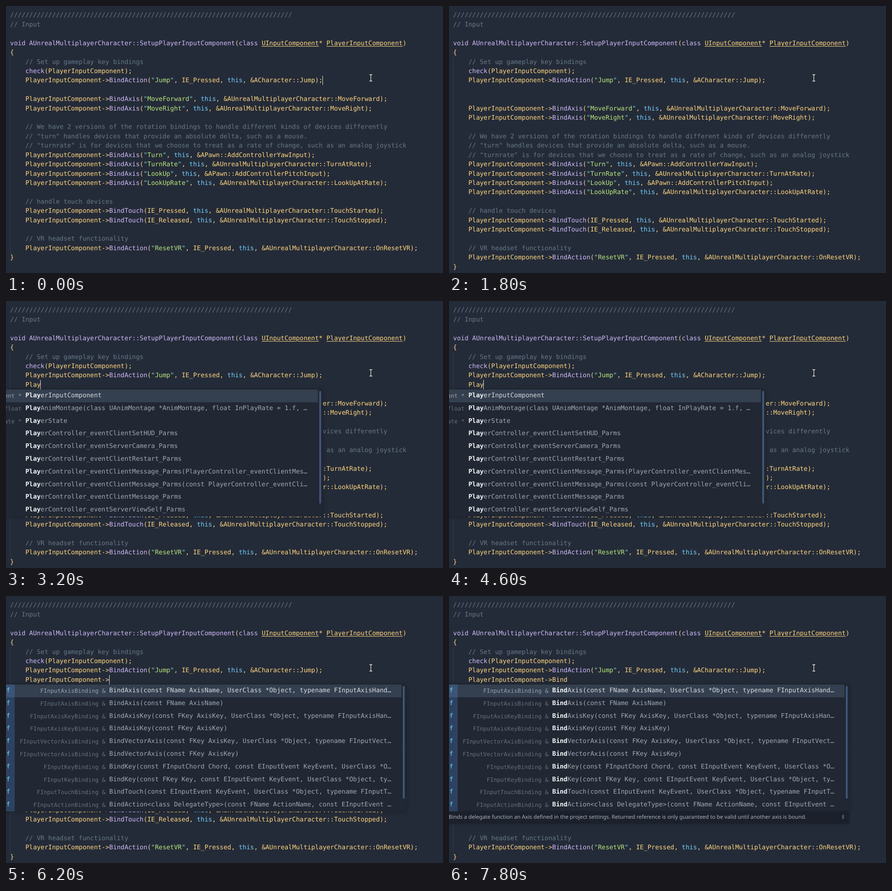
Recreate the animation shown at these times as an HTML page. Size 957 by 585 pixels, loop 8 s.

```html
<!DOCTYPE html>
<html lang="en">
<head>
<meta charset="utf-8">
<title>Code completion</title>
<style>
  html, body { margin: 0; width: 100%; height: 100%; overflow: hidden; background: #242b38; }
  #stage {
    position: relative; width: 957px; height: 585px; overflow: hidden;
    color: #ffd580; font: 13.86px "DejaVu Sans Mono", monospace;
    text-rendering: geometricPrecision; font-variant-ligatures: none;
  }
  #stage div, svg { position: absolute; }
  .line { left: 9.1px; line-height: 20px; white-space: pre; }
  .fn { color: #cfbafa; }
  .str { color: #bae67e; }
  .quote { color: #6fd0d8; }
  .this { color: #73d0ff; }
  .note { color: #667788; }
  u { text-underline-offset: 1.5px; text-decoration-thickness: 1px; }
  #guide { left: 9px; top: 112px; width: 1px; background: #323a48; }
  #caret { width: 1px; background: #e6e6e6; }
  #popup { top: 194px; background: #212733; box-shadow: 0 0 8px rgba(0, 0, 0, .35); }
  .row { left: 0; right: 10px; height: 27.8px; line-height: 27.8px; white-space: pre; color: #a0a9b6; }
  .row div { top: 0; }
  .row.on { background: #343f4f; color: #d5dae1; }
  .row b { color: #f4f6f8; }
  .row .icon { left: 0; width: 28px; height: 100%; background: #2d4260; color: #73d0ff; text-align: center; }
  .row.on .icon { background: #3a5577; }
  .type { font-size: 12.47px; color: #68717e; }
  .on .type { color: #98a2af; }
  .thumb { background: #3f5777; border-radius: 2px; }
  .doc {
    left: 0; right: 0; top: 278px; height: 26px; background: #1b202b; color: #a9b2be;
    box-shadow: 0 1px 5px rgba(0, 0, 0, .3);
    font: 11.76px/25px "Noto Sans", "Open Sans", sans-serif; text-indent: 8px; white-space: pre;
  }
</style>
</head>
<body>
<div id="stage">
  <div id="guide"></div>
  <div id="code"></div>
  <div id="caret"></div>
  <div id="popup"></div>
  <svg width="12" height="20" style="left:793px;top:147px" fill="none">
    <path d="M3 3.5H5.5L6 4L6.5 3.5H9M6 4V17M3 17.5H5.5L6 17L6.5 17.5H9" stroke="#10141b" stroke-width="3"/>
    <path d="M3 3.5H5.5L6 4L6.5 3.5H9M6 4V17M3 17.5H5.5L6 17L6.5 17.5H9" stroke="#fff" stroke-width="1.3"/>
  </svg>
</div>
<script>
const LOOP = 8000, CHAR = 8.345, TYPE_CHAR = 7.507, ROW = 27.8;
const $ = id => document.getElementById(id);
const colX = col => 9.1 + col * CHAR;
const lineY = n => 9.9 + n * 20.42;
const esc = s => s.replace(/&/g, "&amp;").replace(/</g, "&lt;").replace(/>/g, "&gt;");

const pic = "PlayerInputComponent", self = "&AUnrealMultiplayerCharacter::";
const call = (fn, args) => `    ${pic}->${fn}(${args});`;
const axis = (name, target) => call("BindAxis", `"${name}", this, ${target}`);
const head = [
  "/".repeat(74),
  "// Input",
  "",
  `void AUnrealMultiplayerCharacter::SetupPlayerInputComponent(class UInputComponent* ${pic})`,
  "{",
  "    // Set up gameplay key bindings",
  `    check(${pic});`,
  call("BindAction", '"Jump", IE_Pressed, this, &ACharacter::Jump')
];
const tail = [
  "",
  axis("MoveForward", self + "MoveForward"),
  axis("MoveRight", self + "MoveRight"),
  "",
  "    // We have 2 versions of the rotation bindings to handle different kinds of devices differently",
  '    // "turn" handles devices that provide an absolute delta, such as a mouse.',
  '    // "turnrate" is for devices that we choose to treat as a rate of change, such as an analog joystick',
  axis("Turn", "&APawn::AddControllerYawInput"),
  axis("TurnRate", self + "TurnAtRate"),
  axis("LookUp", "&APawn::AddControllerPitchInput"),
  axis("LookUpRate", self + "LookUpAtRate"),
  "",
  "    // handle touch devices",
  call("BindTouch", `IE_Pressed, this, ${self}TouchStarted`),
  call("BindTouch", `IE_Released, this, ${self}TouchStopped`),
  "",
  "    // VR headset functionality",
  call("BindAction", `"ResetVR", IE_Pressed, this, ${self}OnResetVR`),
  "}"
];

const bindAxis = [
  "FInputAxisBinding &|BindAxis(const FName AxisName, UserClass *Object, typename FInputAxisHand…",
  "FInputAxisBinding &|BindAxis(const FName AxisName)"
];
const bindKey = [
  "FInputKeyBinding &|BindKey(const FInputChord Chord, const EInputEvent KeyEvent, UserClass *O…",
  "FInputKeyBinding &|BindKey(const FKey Key, const EInputEvent KeyEvent, UserClass *Object, ty…"
];
const bindAction = "FInputActionBinding &|BindAction(const FName ActionName, const EInputEvent KeyEvent, UserClass …";
const bindDelegate = "FInputActionBinding &|BindAction<class DelegateType>(const FName ActionName, const EInputEvent …";
const bindTouch = "FInputTouchBinding &|BindTouch(const EInputEvent KeyEvent, UserClass *Object, typename FInputT…";
const until = "Returned reference is only guaranteed to be valid until another";

const player = {
  col: 4, right: 693,
  items: [
    "UInputComponent *|PlayerInputComponent",
    "float|PlayAnimMontage(class UAnimMontage *AnimMontage, float InPlayRate = 1.f, …",
    "APlayerState *|PlayerState",
    "|PlayerController_eventClientSetHUD_Parms",
    "|PlayerController_eventServerCamera_Parms",
    "|PlayerController_eventClientRestart_Parms",
    "|PlayerController_eventClientMessage_Parms(PlayerController_eventClientMes…",
    "|PlayerController_eventClientMessage_Parms(const PlayerController_eventCli…",
    "|PlayerController_eventClientMessage_Parms",
    "|PlayerController_eventServerViewSelf_Parms"
  ]
};
const letterB = {
  col: 26, right: 876,
  doc: `Binds a chord event to a delegate function. ${until} input key is bound.`,
  items: [
    ...bindKey, bindAction, bindAction, bindDelegate, bindTouch,
    "FInputGestureBinding &|BindGesture(const FKey GestureKey, UserClass *Object, typename FInputGest…",
    ...bindAxis,
    "void|UActorComponent::BeginPlay()"
  ]
};
const bind = {
  col: 26, right: 876,
  doc: `Binds a delegate function an Axis defined in the project settings. ${until} axis is bound.`,
  items: [
    ...bindAxis,
    "FInputAxisKeyBinding &|BindAxisKey(const FKey AxisKey, UserClass *Object, typename FInputAxisHan…",
    "FInputAxisKeyBinding &|BindAxisKey(const FKey AxisKey)",
    "FInputVectorAxisBinding &|BindVectorAxis(const FKey AxisKey, UserClass *Object, typename FInputVect…",
    "FInputVectorAxisBinding &|BindVectorAxis(const FKey AxisKey)",
    ...bindKey, bindTouch, bindDelegate
  ]
};
const bindPlain = { ...bind, doc: "" };

// start ms, text on the new line (null: no new line yet), caret shown, popup
const arrow = pic + "->";
const steps = [
  [0, null, 1], [200, null, 0],
  [600, "", 1], [800, "", 0], [1400, "", 1], [1800, "", 0],
  [2000, "P", 1], [2200, "P", 1, "Loading..."],
  [2600, "Pl", 0], [2800, "Pl", 1, player], [3000, "Pla", 1, player],
  [3200, "Play", 1, player], [3400, "Play", 0, player], [3800, "Play", 1, player],
  [4200, "Play", 0, player], [4600, "Play", 1, player],
  [4800, pic, 0], [5800, arrow, 1],
  [6200, arrow, 1, bindPlain], [6400, arrow, 1, bind],
  [6800, arrow + "B", 1, letterB], [7000, arrow + "B", 0, letterB],
  [7200, arrow + "Bi", 1, bind], [7400, arrow + "Bin", 1, bind],
  [7600, arrow + "Bind", 1, bind], [7800, arrow + "Bind", 0, bind]
];

const span = (cls, s) => `<span class="${cls}">${s}</span>`;
function paint(text) {
  const s = esc(text);
  if (/^\s*\/\//.test(s)) return span("note", s);
  return s
    .replace(/"(\w+)"|\bthis\b|\b(?:void|class|check)\b|AUnreal\w+::Setup\w+|Bind\w+(?=\()/g, (m, str) =>
      str ? span("quote", '"') + span("str", str) + span("quote", '"')
          : span(m === "this" ? "this" : "fn", m))
    .replace(/(UInputComponent)(\* )(\w+)/, "<u>$1</u>$2<u>$3</u>");
}

function rowHtml(item, i, list, left, prefix) {
  const [type, label] = item.split("|");
  const x = colX(list.col) - left;
  const at = prefix ? label.indexOf(prefix) : 0, end = at + prefix.length;
  const text = `${esc(label.slice(0, at))}<b>${prefix}</b>${esc(label.slice(end))}`;
  return `<div class="row${i ? "" : " on"}" style="top:${i * ROW}px">` +
    '<div class="icon">f</div>' +
    `<div class="type" style="left:${x - 8.4 - type.length * TYPE_CHAR}px">${esc(type)}</div>` +
    `<div style="left:${x}px">${text}</div></div>`;
}

function showPopup(list, typed) {
  const box = $("popup");
  box.hidden = !list;
  box.innerHTML = "";
  if (!list) return;
  if (typeof list === "string") {
    box.style.cssText = `left:11px;width:215px;height:${ROW}px`;
    box.innerHTML = `<div class="row" style="left:8px">${list}</div>`;
    return;
  }
  const widest = Math.max(...list.items.map(s => s.indexOf("|")));
  const left = Math.floor(colX(list.col) - 8.4 - widest * TYPE_CHAR - 38.7);
  const prefix = typed.slice(list.col - 4);
  box.style.cssText = `left:${left}px;width:${list.right - left}px;height:278px`;
  box.innerHTML = list.items.map((s, i) => rowHtml(s, i, list, left, prefix)).join("") +
    '<div class="thumb" style="right:3px;top:3px;width:4px;height:247px"></div>' +
    (list.doc ? `<div class="doc">${list.doc}<div class="thumb" style="right:11px;top:7px;width:4px;height:10px"></div></div>` : "");
}

function show([, typed, caret, list]) {
  const fresh = typed === null;
  const lines = fresh ? [...head, ...tail] : [...head, "    " + typed, ...tail];
  const row = fresh ? 7 : 8;
  const top = Math.round(lineY(row)), bottom = Math.round(lineY(row + 1));
  $("code").innerHTML = lines.map((s, i) =>
    `<div class="line" style="top:${Math.ceil(lineY(i))}px">${paint(s)}</div>`).join("");
  $("guide").style.height = Math.round(lineY(lines.length - 1)) - 112 + "px";
  $("caret").hidden = !caret;
  $("caret").style.cssText =
    `left:${Math.floor(colX(lines[row].length))}px;top:${top}px;height:${bottom - top}px`;
  showPopup(list, typed);
}

let current;
const start = performance.now();
function tick() {
  const t = (performance.now() - start) % LOOP;
  const step = steps.findLast(s => s[0] <= t);
  if (step !== current) show(current = step);
  requestAnimationFrame(tick);
}
tick();
</script>
</body>
</html>
```
